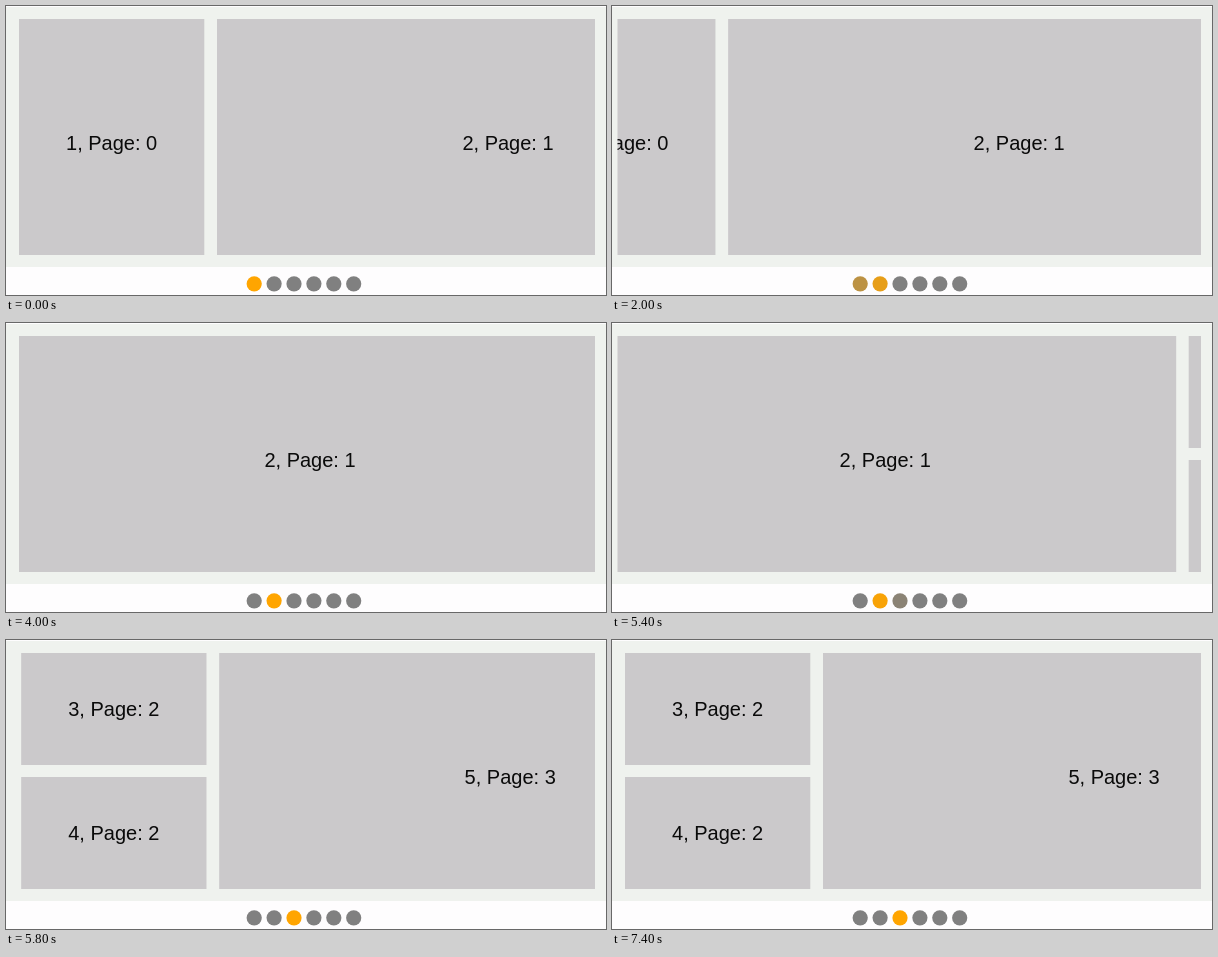
Animation of 600x289 px, one loop 8 s. Source, as an HTML page:

```html
<!DOCTYPE html>
<html lang="en">
<head>
<meta charset="utf-8">
<title>Page carousel</title>
<style>
  html, body { margin: 0; width: 100%; height: 100%; overflow: hidden; background: #fefdfe; }
  svg { display: block; width: 100%; height: 100%; }
  text { font: 20px "Liberation Sans", Arial, sans-serif; text-anchor: middle; fill: #0a0a0a; }
</style>
</head>
<body>
<svg viewBox="0 0 600 289">
  <defs><clipPath id="view"><rect x="5.5" y="0" width="583.5" height="261"/></clipPath></defs>
  <rect width="600" height="289" fill="#fefdfe"/>
  <rect y="1" width="600" height="260" fill="#eff2ee"/>
  <g clip-path="url(#view)"><g id="track"></g></g>
  <g id="dots"></g>
</svg>
<script>
const LOOP = 8000, SLIDE = 470;
const GREY = [128, 128, 128], ORANGE = [255, 165, 0];
const stops = [0, 198, 792.5];          // scroll offset of each page
const starts = [1868, 5369];            // when each slide begins
const items = [
  // x, y, width, height, baseline, label
  [13, 13, 185.3, 236, 144, '1, Page: 0'],
  [211, 13, 582, 236, 144, '2, Page: 1'],
  [805.5, 13, 185.3, 112, 75.5, '3, Page: 2'],
  [805.5, 137, 185.3, 112, 199.5, '4, Page: 2'],
  [1003.5, 13, 582, 236, 144, '5, Page: 3']
];
const track = document.getElementById('track');

function add(parent, tag, attrs, label) {
  const el = document.createElementNS('http://www.w3.org/2000/svg', tag);
  for (const key in attrs) el.setAttribute(key, attrs[key]);
  if (label) el.textContent = label;
  return parent.appendChild(el);
}

for (const [x, y, width, height, base, label] of items) {
  add(track, 'rect', { x, y, width, height, fill: '#cbc9cb' });
  add(track, 'text', { x: x + width / 2, y: base }, label);
}
const dots = Array.from({ length: 6 }, (_, i) =>
  add(document.getElementById('dots'), 'circle', { cx: 248.2 + i * 19.9, cy: 277.8, r: 7.6 }));

const clamp = v => Math.min(1, Math.max(0, v));

// cubic-bezier(.25, .1, .25, 1)
function ease(p) {
  if (p <= 0 || p >= 1) return clamp(p);
  const curve = (s, a, b) => 3 * (1 - s) ** 2 * s * a + 3 * (1 - s) * s * s * b + s ** 3;
  let lo = 0, hi = 1;
  for (let i = 0; i < 24; i++) {
    const mid = (lo + hi) / 2;
    if (curve(mid, 0.25, 0.25) < p) lo = mid; else hi = mid;
  }
  return curve(lo, 0.1, 1);
}

const tint = k => `rgb(${GREY.map((g, i) => Math.round(g + (ORANGE[i] - g) * k))})`;

function draw(t) {
  const [a, b] = starts.map(s => ease((t - s) / SLIDE));
  const scroll = stops[1] * a + (stops[2] - stops[1]) * b;
  track.setAttribute('transform', `translate(${-scroll.toFixed(2)} 0)`);
  // the new dot lights up a little faster than the old one fades
  const inA = clamp(a * 1.7), inB = clamp(b * 1.7);
  const glow = [clamp(1 - a * 1.1), inA * clamp(1 - b * 1.1), inB];
  dots.forEach((dot, i) => dot.setAttribute('fill', tint(glow[i] || 0)));
}

const begin = performance.now();
function frame() {
  draw((performance.now() - begin) % LOOP);
  requestAnimationFrame(frame);
}
draw(0);
requestAnimationFrame(frame);
</script>
</body>
</html>
```
